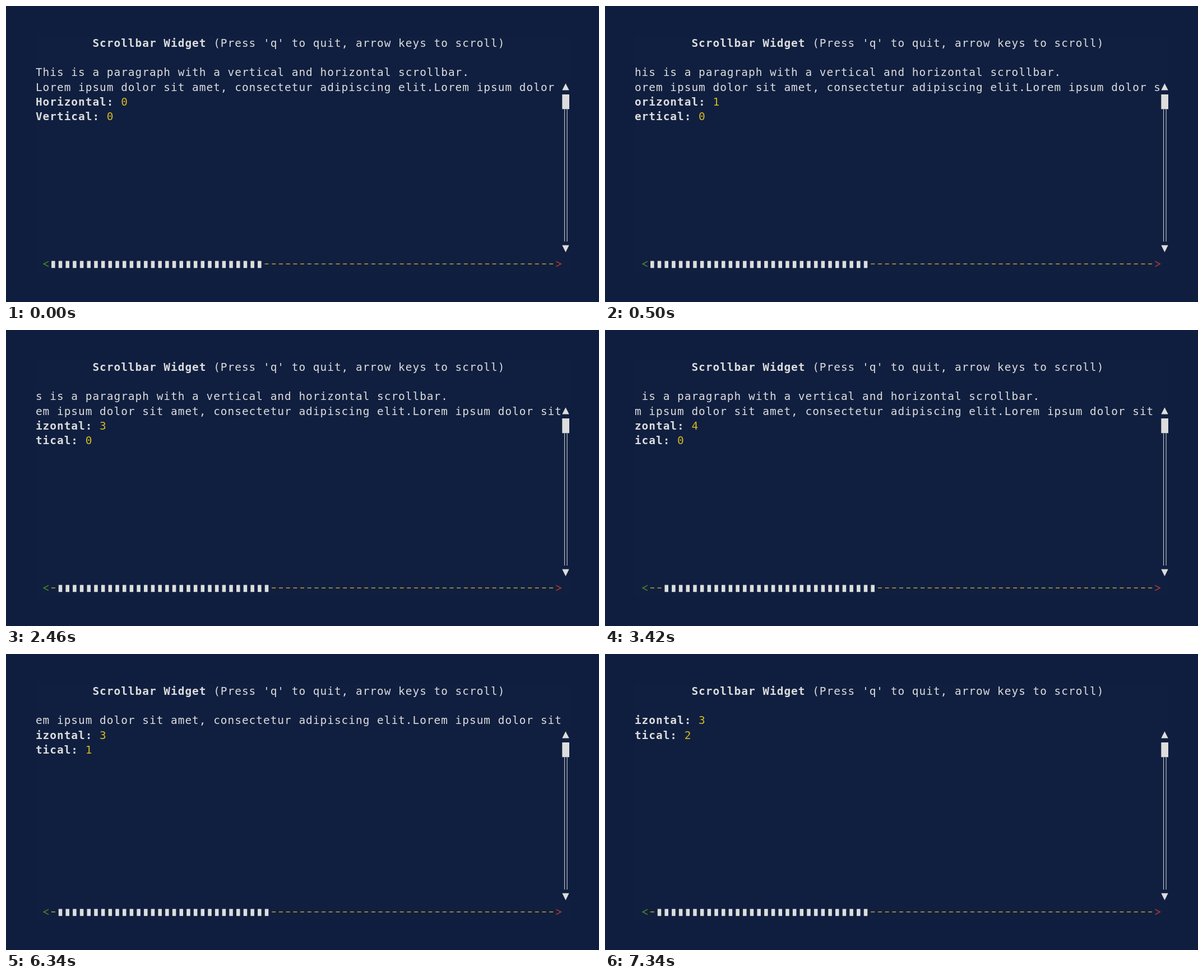
Animation of 1058x529 px, one loop 8 s. Source, as an HTML page with a canvas:

```html
<!DOCTYPE html>
<html lang="en">
<head>
<meta charset="utf-8">
<title>Scrollbar Widget</title>
<style>
  html, body { margin: 0; width: 100%; height: 100%; overflow: hidden; background: #0f1d3f; }
  canvas { display: block; }
</style>
</head>
<body>
<canvas id="stage" width="1058" height="529"></canvas>
<script>
const ctx = document.getElementById('stage').getContext('2d');

const LOOP = 8000;
const COLS = 75, ROWS = 16;
const LEFT = 52.9, TOP = 52.9, CELL_W = 12.69, CELL_H = 26.33;
const BASELINE = 19.8;
const TRACK = 71, VIEWPORT = 73, SCROLL_RANGE = 172;

const WHITE = '#dddddd', YELLOW = '#d3b91f', DASH = '#c0a530',
      GREEN = '#4d8a22', RED = '#b23a30';
const LOREM = 'Lorem ipsum dolor sit amet, consectetur adipiscing elit.';

// start time, horizontal scroll, vertical scroll
const STEPS = [
  [0, 0, 0], [500, 1, 0], [1500, 2, 0], [2460, 3, 0],
  [3420, 4, 0], [5380, 3, 0], [6340, 3, 1], [7340, 3, 2],
];

const colX = col => LEFT + col * CELL_W;
const rowY = row => TOP + row * CELL_H;

const plain = text => ({ text, color: WHITE, weight: 'normal' });
const bold = text => ({ text, color: WHITE, weight: 'bold' });
const number = value => ({ text: String(value), color: YELLOW, weight: 'normal' });

function drawLine(runs, row, firstCol, scroll = 0, width = COLS) {
  const cells = runs.flatMap(({ text, color, weight }) =>
    [...text].map(char => ({ char, color, weight })));
  cells.slice(scroll, scroll + width).forEach(({ char, color, weight }, i) => {
    ctx.font = `${weight} 19.4px "DejaVu Sans Mono", monospace`;
    ctx.fillStyle = color;
    ctx.fillText(char, colX(firstCol + i), rowY(row) + BASELINE);
  });
}

function fillRect(color, x, y, w, h) {
  ctx.fillStyle = color;
  ctx.fillRect(x, y, w, h);
}

function triangle(baseY, tipY) {
  ctx.fillStyle = WHITE;
  ctx.beginPath();
  ctx.moveTo(992.3, baseY);
  ctx.lineTo(1004.7, baseY);
  ctx.lineTo(998.5, tipY);
  ctx.fill();
}

function chevron(color, openX, tipX) {
  ctx.strokeStyle = color;
  ctx.lineWidth = 1.6;
  ctx.beginPath();
  ctx.moveTo(openX, 456.4);
  ctx.lineTo(tipX, 461);
  ctx.lineTo(openX, 465.6);
  ctx.stroke();
}

function drawVerticalBar() {
  triangle(150.6, 138.2);
  triangle(427.6, 440);
  fillRect(WHITE, 992.3, 158, 12.7, 26.3);
  for (const x of [996, 1000.6]) fillRect('#c9cbd0', x, 184.3, 1.1, 236.7);
}

function drawHorizontalBar(position) {
  const toTrack = value => Math.round(value * TRACK / SCROLL_RANGE);
  const start = toTrack(position), end = toTrack(position + VIEWPORT);
  chevron(GREEN, 76, 67.3);
  for (let i = 0; i < TRACK; i++) {
    const x = colX(i + 2) + 2.8;
    if (i >= start && i < end) fillRect(WHITE, x, 455.6, 6.5, 12.6);
    else fillRect(DASH, x - 0.2, 460.2, 7, 1.5);
  }
  chevron(RED, 981.4, 990.1);
}

function draw(horizontal, vertical) {
  fillRect('#0f1d3f', 0, 0, 1058, 529);
  fillRect('#101f3f', 53, 53, 952, 422);
  drawLine([bold('Scrollbar Widget'), plain(" (Press 'q' to quit, arrow keys to scroll)")], 0, 8);

  const paragraph = [
    [plain('This is a paragraph with a vertical and horizontal scrollbar.')],
    [plain(LOREM.repeat(2))],
    [bold('Horizontal: '), number(horizontal)],
    [bold('Vertical: '), number(vertical)],
  ];
  paragraph.slice(vertical).forEach((runs, i) =>
    drawLine(runs, i + 2, 0, horizontal, COLS - 1));

  drawVerticalBar();
  drawHorizontalBar(horizontal);
}

let shown;
function tick() {
  const time = performance.now() % LOOP;
  const step = STEPS.findLast(([start]) => start <= time);
  if (step !== shown) {
    shown = step;
    draw(step[1], step[2]);
  }
  requestAnimationFrame(tick);
}
tick();
</script>
</body>
</html>
```
